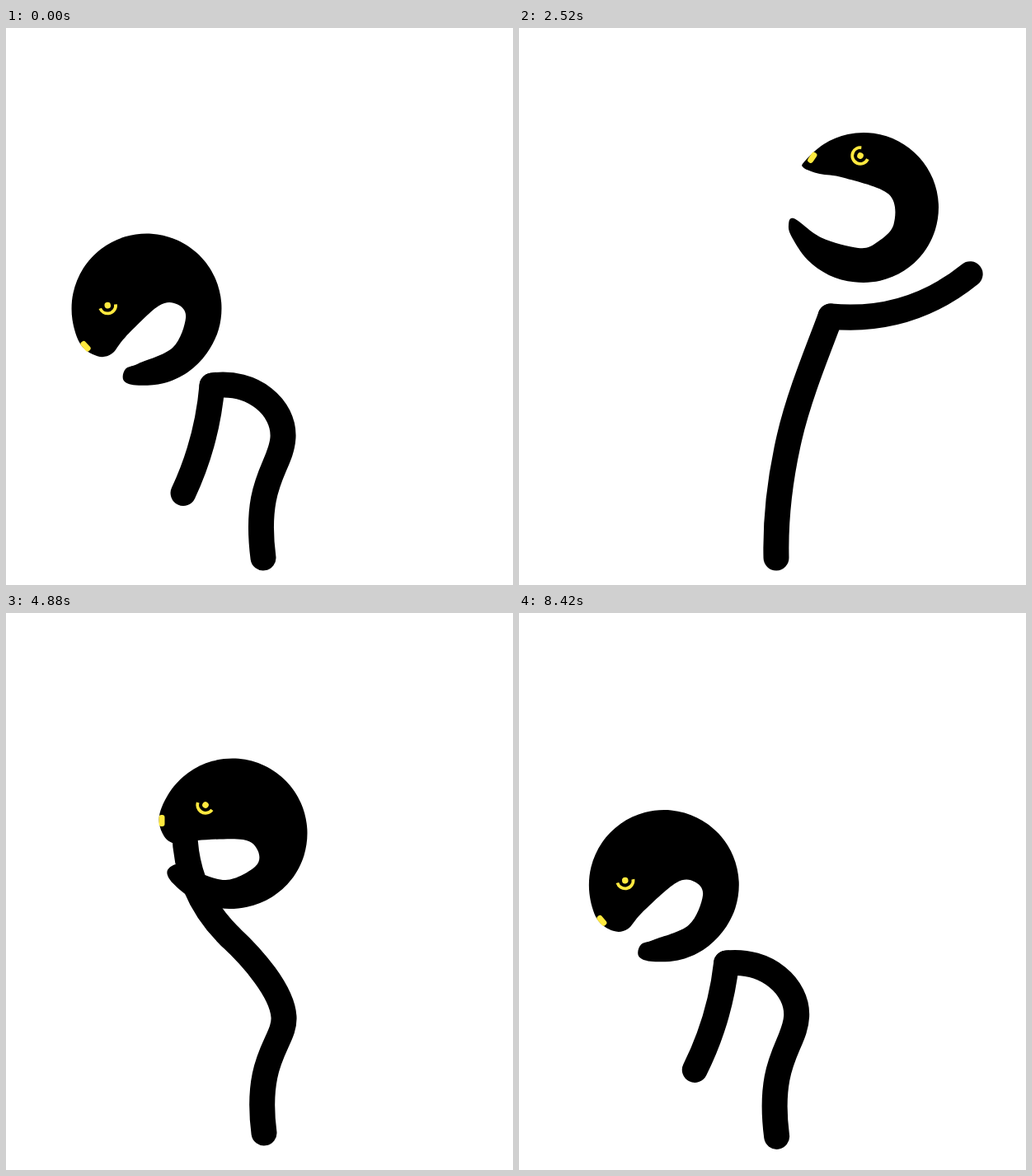
These frames come from a looping animation (615 px wide and 676 px high, 8460 ms). An HTML page:

```html
<!DOCTYPE html>
<html lang="en">
<head>
<meta charset="utf-8">
<title>Figure</title>
<style>
  html, body { margin: 0; width: 100%; height: 100%; overflow: hidden; background: #fff; }
  svg { display: block; width: 100%; height: 100%; }
  .limb { fill: none; stroke: #000; stroke-width: 31; stroke-linecap: round; stroke-linejoin: round; }
</style>
</head>
<body>
<svg viewBox="0 0 615 676">
  <path id="spine" class="limb"/>
  <path id="arm" class="limb"/>
  <g id="head">
    <path id="skull"/>
    <rect x="-89" y="-22.5" width="7" height="14" rx="3" fill="#ffe93f"/>
    <g id="eye">
      <circle id="ring" r="9.8" pathLength="360" fill="none" stroke="#ffe93f" stroke-width="3.8"/>
      <circle r="3.8" fill="#ffe93f"/>
    </g>
  </g>
  <ellipse id="tear" rx="4" ry="1.7" fill="#9be4f5"/>
</svg>
<script>
const LOOP = 8460, STEP = 40, RAD = Math.PI / 180;
const $ = id => document.getElementById(id);
const polar = (deg, r) => [r * Math.cos(deg * RAD), r * Math.sin(deg * RAD)];
const add = (p, q, k = 1) => p.map((v, i) => v + q[i] * k);

// Blends numbers, lists and objects of the same form
function mix(a, b, k) {
  if (typeof a === 'number') return a + (b - a) * k;
  if (Array.isArray(a)) return a.map((v, i) => mix(v, b[i], k));
  return Object.fromEntries(Object.keys(a).map(key => [key, mix(a[key], b[key], k)]));
}

// A round skull closed by the jaw tip, mouth and snout
function outline(from, to, tilt, mouth) {
  const skull = Array.from({ length: 16 }, (_, i) =>
    polar(from + (to - from) * i / 15, 91 + Math.max(0, i - 12)));
  const turned = mouth.map(([x, y]) => polar(Math.atan2(y, x) / RAD - tilt, Math.hypot(x, y)));
  return [...skull, ...turned];
}

// Closed smooth curve through the points
function smooth(p) {
  const at = i => p[(i + p.length) % p.length];
  return `M${p[0]}` + p.map((b, i) => {
    const c = at(i + 1);
    const leave = add(b, add(c, at(i - 1), -1), 1 / 6);
    const arrive = add(c, add(at(i + 2), b, -1), -1 / 6);
    return `C${leave} ${arrive} ${c}`;
  }).join('') + 'Z';
}

const calm = outline(193, 500, 0, [[-79, 46], [-68, 37.5], [-52, 43], [-8, 56.5], [28, 40],
  [31, 21], [13, 7.5], [-42, 8.5], [-68, 12.5], [-83, 3]]);
const open = outline(184, 483, 34, [[-91, 22], [-85, 13.5], [-54, 38], [-7, 54], [12, 47],
  [39, 23], [39, -10], [-24, -40], [-58, -40], [-73, -48]]);
const chewing = outline(184, 483, 34, [[-91, 22], [-83, 13], [-46, 34], [-6, 40], [20, 36],
  [32, 16], [16, -27], [-24, -30], [-45, -43], [-72, -49]]);

// Handles are offsets of curve controls from their joints; arm is [angle, reach, bow]
const crouch = {
  head: [170.5, 340.5], tilt: -42, shape: calm, eye: [-32.5, -34.5], lid: -1.5,
  neck: [250, 434], neckHandle: [50, -7], hip: [336, 497], hipHandle: [-2, 36],
  foot: [312, 643], footHandle: [-12, -93], arm: [105, 135, 6]
};
const dip = { ...crouch, head: [173.5, 344], tilt: -45, arm: [80, 180, 0] };
const wail = {
  head: [418, 218], tilt: 34, shape: open, eye: [-38.5, -50], lid: 6.5,
  neck: [378, 350], neckHandle: [-14, 38], hip: [328, 497], hipHandle: [-12, 52],
  foot: [312, 643], footHandle: [-1, -43], arm: [345.5, 176, -18]
};
const sob = { ...wail, shape: chewing, arm: [339, 178, -18] };
const stand = {
  ...crouch, head: [273.5, 279.5], tilt: 0, lid: -3,
  neck: [271, 405], neckHandle: [27, 25], hip: [336, 502], hipHandle: [2, 31], arm: [191, 139, 28]
};
const reach = { ...stand, arm: [255, 140, 15] };
const leap = {
  ...stand, head: [287.5, 111.5], lid: 14,
  neck: [285, 237], hip: [350, 334], foot: [326, 475], arm: [138, 132, 5]
};

const timeline = [[0, crouch], [440, dip], [880, crouch], [1120, crouch], [1800, wail],
  [2240, sob], [2680, wail], [3120, sob], [3600, wail], [4040, stand], [4440, stand],
  [4840, reach], [5400, leap], [8020, leap], [LOOP, crouch]];

function poseAt(t) {
  const i = timeline.findIndex(([time]) => time >= t) || 1;
  const [t0, a] = timeline[i - 1], [t1, b] = timeline[i];
  return mix(a, b, (t - t0) / (t1 - t0));
}

function draw(t) {
  const p = poseAt(t);
  $('spine').setAttribute('d', `M${p.neck}C${add(p.neck, p.neckHandle)} ${add(p.hip, p.hipHandle, -1)} ${p.hip}` +
    `C${add(p.hip, p.hipHandle)} ${add(p.foot, p.footHandle)} ${p.foot}`);

  const [angle, length, bow] = p.arm;
  const hand = add(p.neck, polar(angle, length));
  const elbow = add(mix(p.neck, hand, 0.5), polar(angle - 90, bow * 2));
  $('arm').setAttribute('d', `M${p.neck}Q${elbow} ${hand}`);

  $('head').setAttribute('transform', `translate(${p.head}) rotate(${p.tilt})`);
  $('skull').setAttribute('d', smooth(p.shape));

  // The lid hides the part of the ring above it
  const gap = Math.acos(Math.min(1, p.lid / 11)) / RAD;
  $('eye').setAttribute('transform', `translate(${p.eye}) rotate(${gap - 63})`);
  $('ring').setAttribute('stroke-dasharray', gap ? `${360 - 2 * gap} 360` : 'none');

  const drop = (t - 1800) % 880 / 880;
  const crying = t >= 1800 && t < 3560 && drop < 0.35;
  $('tear').setAttribute('visibility', crying ? 'visible' : 'hidden');
  $('tear').setAttribute('transform', `translate(${427 + drop * 24} ${167 + drop * 30}) rotate(18)`);
}

function frame() {
  draw(Math.round(performance.now() % LOOP / STEP) * STEP % LOOP);
  requestAnimationFrame(frame);
}
draw(0);
requestAnimationFrame(frame);
</script>
</body>
</html>
```
